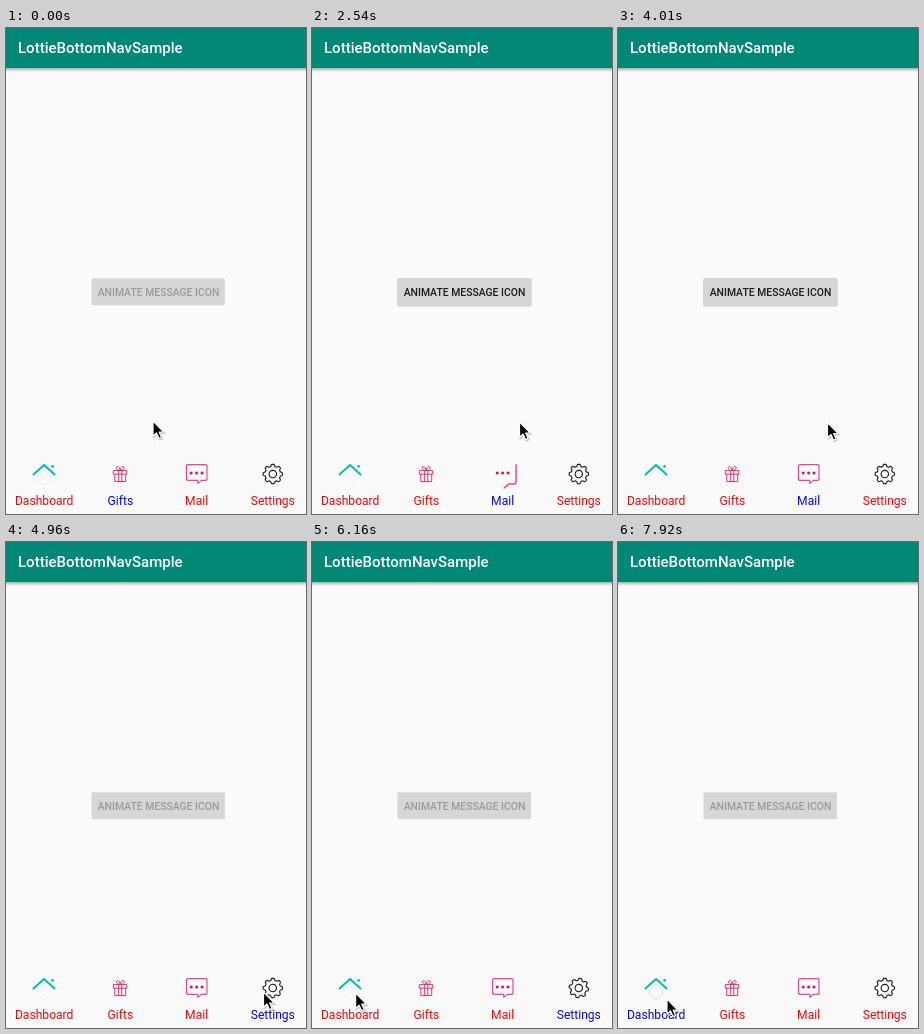
Write an HTML page that moves like this. It is 300 by 486 pixels and loops after 8 s.

```html
<!DOCTYPE html>
<html lang="en">
<head>
<meta charset="utf-8">
<title>Bottom navigation</title>
<style>
  html, body { margin: 0; width: 100%; height: 100%; overflow: hidden; background: #fafafa; }
  svg { display: block; width: 100%; height: 100%; }
  text { font-family: Roboto, sans-serif; }
  .mid { text-anchor: middle; }
  .label { font-size: 12.1px; }
  .line { fill: none; stroke-linejoin: round; stroke-linecap: round; }
</style>
</head>
<body>
<svg viewBox="0 0 300 486">
  <defs>
    <linearGradient id="shade" x2="0" y2="1">
      <stop stop-color="#000" stop-opacity=".3"/>
      <stop offset="1" stop-color="#000" stop-opacity="0"/>
    </linearGradient>
  </defs>
  <rect width="300" height="486" fill="#fafafa"/>
  <rect y="40" width="300" height="4" fill="url(#shade)"/>
  <rect width="300" height="40" fill="#008776"/>
  <text x="12" y="25.2" font-size="15" font-weight="500" fill="#fff">LottieBottomNavSample</text>

  <rect id="lift" x="85" y="250" width="134.8" height="28.8" rx="2" fill="#000" opacity="0"/>
  <rect x="85.5" y="250.3" width="133.5" height="27" rx="1.5" fill="#d6d6d6"/>
  <text id="action" class="mid" x="152.5" y="268" font-size="10.4" font-weight="500">ANIMATE MESSAGE ICON</text>

  <g id="home" class="line">
    <path id="house" d="M31.5 448L38 442L44.5 448V453L38 457.5L31.5 453Z" stroke-width="1"/>
    <path d="M27.5 446.6L38 437L48.5 446.6" stroke="#00bfae" stroke-width="2"/>
    <circle cx="46.6" cy="438.4" r="1.4" fill="#00bfae"/>
  </g>

  <g class="line" stroke="#dc2a6a" stroke-width=".95">
    <path d="M107.7 442.6H120.8V446.2H107.7ZM108.8 446.2V453.6H119.7V446.2M112.7 442.6V453.6M115.8 442.6V453.6"/>
    <path d="M114.2 442.4C110 442.4 109.4 439 111.2 438.6S114 440.6 114.2 442.4C114.5 440.6 115.5 438.2 117.3 438.6S118.4 442.4 114.2 442.4"/>
  </g>

  <g id="mail">
    <path id="bubble" class="line" pathLength="1" stroke="#f0408f" stroke-width="1.15"
      d="M201 437.5V450.4Q201 452.4 199 452.4H195.4L191.8 455.4V452.4H182.5Q180.5 452.4 180.5 450.4V438.5Q180.5 436.6 182.5 436.6H199Q201 436.6 201 438.5"/>
    <g id="dots" fill="#d4145a"></g>
  </g>

  <g id="gear" class="line" stroke="#1c1c1c" stroke-width="1.15">
    <path id="cog"/>
    <circle r="3.7"/>
  </g>

  <g id="labels"></g>
  <g id="cursor" stroke-linejoin="round">
    <path d="M.6 1V16.2L4.1 13L6.6 18.6L9.2 17.5L6.8 12H11.4Z" stroke="#000" stroke-width="2" opacity=".2"/>
    <path d="M0 0V15.2L3.5 12L6 17.6L8.6 16.5L6.2 11H10.8Z" stroke="#fff" stroke-width="1.2"/>
  </g>
</svg>
<script>
const LOOP = 8000;
const MAIL = 2130, SETTINGS = 4900, DASHBOARD = 7400;
const NS = 'http://www.w3.org/2000/svg';
const $ = id => document.getElementById(id);
const clamp = (x, lo = 0, hi = 1) => Math.min(hi, Math.max(lo, x));
const span = (t, a, b) => clamp((t - a) / (b - a));
const ease = x => x * x * (3 - 2 * x);
const mix = (a, b, k) => a + (b - a) * k;

function add(parent, tag, attrs, text = '') {
  const el = document.createElementNS(NS, tag);
  for (const key in attrs) el.setAttribute(key, attrs[key]);
  el.textContent = text;
  parent.append(el);
  return el;
}

const labels = ['Dashboard', 'Gifts', 'Mail', 'Settings'].map((name, i) =>
  add($('labels'), 'text', { class: 'mid label', x: 38.2 + 76.2 * i, y: 476.5 }, name));

const dots = [185.2, 190.6, 196].map(cx => add($('dots'), 'circle', { cx, cy: 445, r: 1.5 }));

// Eight soft teeth: a clipped cosine around a circle
function cogPath(teeth, radius, depth) {
  const points = [];
  for (let i = 0; i < 160; i++) {
    const a = i / 160 * 2 * Math.PI;
    const r = radius + depth * clamp(1.6 * Math.cos(teeth * a), -1, 1);
    points.push(`${(r * Math.sin(a)).toFixed(2)} ${(-r * Math.cos(a)).toFixed(2)}`);
  }
  return `M${points.join('L')}Z`;
}
$('cog').setAttribute('d', cogPath(8, 8.7, 1));

// Pointer stops: time, x, y
const stops = [
  [0, 147, 393], [830, 147, 393], [1490, 198, 449.5], [1670, 198, 449.5],
  [1840, 191.5, 447.5], [2190, 191.5, 447.5], [2520, 207.5, 394], [2800, 209.5, 394.5],
  [4010, 209.5, 394.5], [4540, 257.5, 450], [5020, 257.5, 450], [5640, 94, 397.5],
  [5740, 94, 397.5], [6240, 40, 455], [6510, 49, 457], [LOOP, 49, 457]
];

function pointer(t) {
  const i = Math.max(1, stops.findIndex(s => s[0] > t));
  const [t0, x0, y0] = stops[i - 1], [t1, x1, y1] = stops[i];
  const k = ease(span(t, t0, t1));
  return [mix(x0, x1, k), mix(y0, y1, k)];
}

function render(t) {
  const active = t < MAIL ? 1 : t < SETTINGS ? 2 : t < DASHBOARD ? 3 : 0;
  labels.forEach((el, i) => el.setAttribute('fill', i === active ? '#00f' : '#f00'));

  const enabled = active === 2;
  $('action').setAttribute('fill', enabled ? '#1c1c1c' : '#9b9b9b');
  $('lift').setAttribute('opacity', enabled ? .15 * span(t, MAIL, MAIL + 120) : 0);

  // The bubble outline is drawn while the icon settles to its size.
  const busy = t >= MAIL && t < 3420;
  const drawn = busy ? span(t, MAIL + 60, 3250) : 1;
  const grow = busy ? mix(1.3, 1, ease(span(t, 2540, 3380))) : 1;
  $('bubble').setAttribute('stroke-dasharray', `${drawn} 2`);
  $('bubble').setAttribute('transform', `translate(190.7 440) scale(${grow}) translate(-190.7 -440)`);
  dots.forEach((el, i) => {
    const k = busy ? span(t, MAIL + 80 * i, MAIL + 180 + 80 * i) : 1;
    el.setAttribute('r', 1.5 * k);
  });

  const turn = 360 * ease(span(t, SETTINGS, 7340));
  $('gear').setAttribute('transform', `translate(266.8 446) rotate(${turn})`);

  const grey = Math.round(mix(240, 222, span(t, DASHBOARD, 7900)));
  $('house').setAttribute('stroke', `rgb(${grey},${grey},${grey})`);

  const [x, y] = pointer(t);
  $('cursor').setAttribute('transform', `translate(${x} ${y})`);
}

function frame(now) {
  render(now % LOOP);
  requestAnimationFrame(frame);
}
render(0);
requestAnimationFrame(frame);
</script>
</body>
</html>
```
